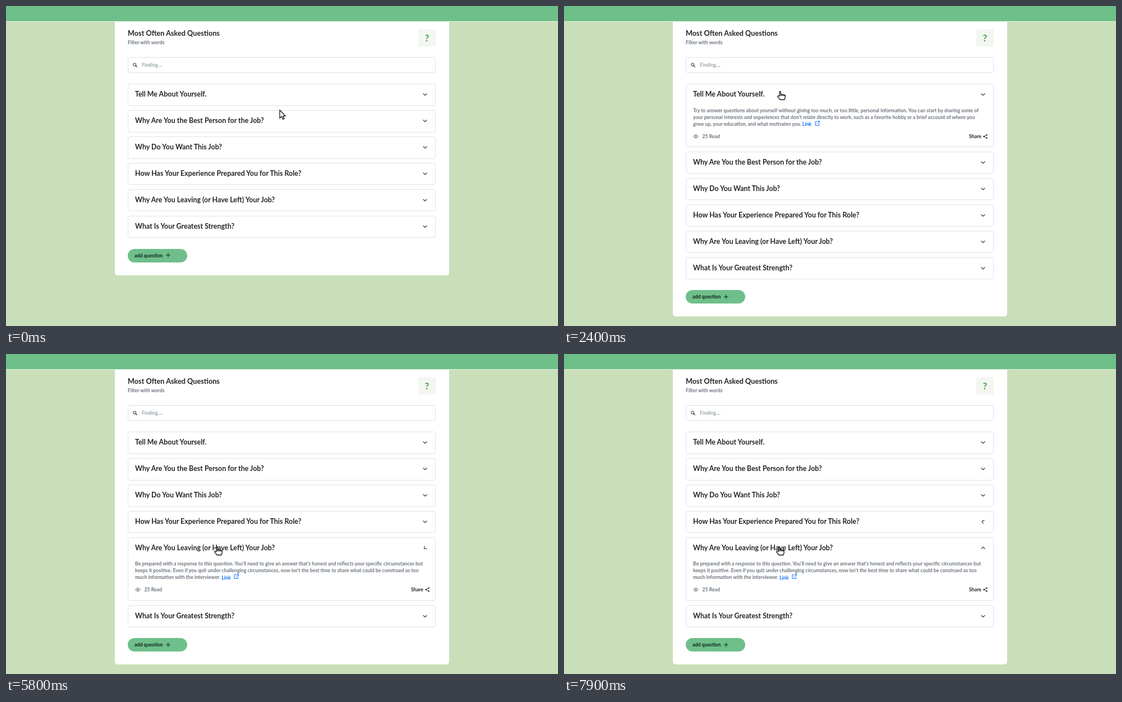
Animation of 984 by 569 pixels, one loop 8000 ms. Source, as an HTML page:

```html
<!DOCTYPE html>
<html lang="en">
<head>
<meta charset="utf-8">
<title>Questions</title>
<style>
  html, body { margin: 0; width: 100%; height: 100%; overflow: hidden; background: #c9dfb9; }
  body { position: relative; font: 700 8.75px Lato, "Noto Sans", sans-serif; color: #212529; white-space: nowrap; }
  svg { fill: none; stroke: currentColor; overflow: visible; }
  #bar { position: absolute; inset: 0 0 auto; height: 27px; background: #6fbf8b; border-bottom: 1px solid #e8f2e3; }
  #page { position: absolute; left: 194px; top: 0; width: 596px; }
  #card { position: relative; box-sizing: border-box; padding: 138.3px 24px 23px 23px; background: #fff; border-radius: 0 0 5px 5px; }
  .at { position: absolute; line-height: 20px; }
  #title { left: 23px; top: 38px; font-size: 12.7px; }
  #sub { left: 23px; top: 55px; color: #6c757d; }
  #help { left: 541px; top: 41px; width: 31px; height: 31px; border-radius: 4px; background: #f4f6f1; color: #43a547; font-size: 17px; line-height: 31px; text-align: center; }
  #search { left: 23px; top: 91px; width: 549px; height: 28px; box-sizing: border-box; border: 1px solid #dee2e6; border-radius: 4px; padding-left: 24px; line-height: 26px; color: #9ba5ab; }
  #search svg { position: absolute; left: 8px; top: 9px; color: #212529; }
  .item { position: relative; box-sizing: border-box; height: 39.4px; margin-bottom: 7.53px; border: 1px solid #dfe3e6; border-radius: 4px; overflow: hidden; }
  .item.open { height: 113.2px; }
  .item > * { position: absolute; }
  .item h2 { margin: 0; left: 12px; top: 8px; font-size: 12.45px; line-height: 20px; }
  .chevron { left: 523.5px; top: 13px; color: #4a4f54; }
  .more { display: none; left: 12px; top: 40.5px; width: 524px; color: #6c757d; }
  .open .more { display: block; }
  .more p { margin: 0; height: 36px; line-height: 11.9px; }
  .more b { color: #0d6efd; }
  .more b svg { margin-left: 3.5px; vertical-align: .3px; }
  .reads, .share { position: absolute; top: 42px; line-height: 20px; }
  .reads { left: 16.5px; }
  .reads svg { position: absolute; left: -16.5px; top: 6px; }
  .share { right: 10px; color: #212529; }
  .share svg { position: absolute; left: calc(100% + 2.5px); top: 6px; }
  #add { position: relative; margin-top: 19.4px; width: 106px; height: 24px; border-radius: 12px; background: #6fbf8b; color: #10251a; line-height: 23px; text-indent: 12px; }
  #add svg { position: absolute; left: 68px; top: 7.5px; }
  #cursor { position: absolute; left: 0; top: 0; }
  #cursor path { fill: #fff; stroke: #111; stroke-width: 1.3; stroke-linejoin: round; }
</style>
</head>
<body>
<div id="page"><div id="card">
  <div class="at" id="title">Most Often Asked Questions</div>
  <div class="at" id="sub">Filter with words</div>
  <div class="at" id="help">?</div>
  <div class="at" id="search"><svg width="8" height="8"><circle cx="3.2" cy="3.2" r="2.5"/><path d="M5 5L7.5 7.5" stroke-width="1.3"/></svg>Finding....</div>
  <div id="items"></div>
  <div id="add">add question<svg width="8" height="8"><path d="M4 0V8M0 4H8"/></svg></div>
</div></div>
<div id="bar"></div>
<svg id="cursor" width="18" height="20"><path></path></svg>
<script>
const LOOP = 8000, STEP = 100;

const questions = [
  ["Tell Me About Yourself.",
   "Try to answer questions about yourself without giving too much, or too little, personal information. You can start by sharing some of",
   "your personal interests and experiences that don’t relate directly to work, such as a favorite hobby or a brief account of where you",
   "grew up, your education, and what motivates you. "],
  ["Why Are You the Best Person for the Job?",
   "Are you the best candidate for the job? The hiring manager wants to know whether you have all the required qualifications. Be",
   "prepared to explain why you're the applicant who should be hired. Make your response a confident, concise, focused sales",
   "pitch that explains what you have to offer. "],
  ["Why Do You Want This Job?",
   "Why are you a good fit for the position? What would you accomplish if you were hired? This interview question gives you an opportunity",
   "to show the interviewer what you know about the job and the company, so take time beforehand to thoroughly research the company,",
   "its products, services, culture, and mission. "],
  ["How Has Your Experience Prepared You for This Role?",
   "Hiring managers use this question to learn how your previous work experience and educational background fit the job. To prepare to",
   "respond, make a list of the most relevant qualifications you have and match them to the requirements listed in the job description.",
   ""],
  ["Why Are You Leaving (or Have Left) Your Job?",
   "Be prepared with a response to this question. You'll need to give an answer that's honest and reflects your specific circumstances but",
   "keeps it positive. Even if you quit under challenging circumstances, now isn't the best time to share what could be construed as too",
   "much information with the interviewer. "],
  ["What Is Your Greatest Strength?"]
];

// Per item: [time, open, chevron angle]
const toggles = [
  [[2400, 1, 0], [2900, 1, 70], [3000, 1, 180], [3300, 0, 110], [3400, 0, 0]],
  [[3800, 1, 45], [3900, 1, 180], [4100, 0, 110], [4200, 0, 0]],
  [[4700, 1, 40], [4800, 1, 180], [5000, 0, 110], [5100, 0, 0]],
  [[6400, 1, 45], [6500, 1, 180], [7800, 0, 160], [7900, 0, 110]],
  [[5800, 1, 45], [5900, 1, 180]],
  []
];

// [time, offset]
const scroll = [[6600, 0], [6700, 22.3], [6800, 54], [6900, 74], [7000, 74], [7400, 0]];

// [time, x, y, shape]
const path = [
  [0, 487, 184, "arrow"], [200, 477, 189, "hand"], [300, 477, 189, "hand"],
  [1100, 410, 157, "hand"], [1200, 398, 136, "arrow"], [1400, 355, 105, "beam"],
  [1500, 343, 101, "beam"], [1700, 343, 101, "beam"], [1800, 344, 100, "beam"],
  [1900, 344, 100, "arrow"], [2200, 374, 142, "hand"], [2400, 380, 151, "hand"],
  [3300, 380, 152, "hand"], [3700, 363, 211, "hand"], [4100, 362, 212, "hand"],
  [4300, 361, 263, "hand"], [4400, 361, 263, "hand"], [4500, 360, 253, "hand"],
  [5100, 360, 253, "hand"], [5300, 370, 344, "hand"], [5500, 370, 344, "hand"],
  [5600, 371, 342, "hand"], [5900, 371, 342, "hand"], [6200, 365, 299, "hand"],
  [6600, 365, 299, "hand"], [6700, 374, 361, "arrow"], [7000, 374, 361, "arrow"],
  [7400, 361, 316, "hand"], [7500, 361, 316, "hand"], [7600, 361, 305, "hand"],
  [7700, 361, 305, "hand"], [7900, 378, 342, "hand"]
];

const shapes = {
  arrow: "M1 1V15.5L4.4 12.4L6.7 17.4L9 16.3L6.8 11.6H11.3Z",
  hand: "M4.2 9V2.2Q4.2 1 5.3 1T6.4 2.2V6.3Q7.4 5.4 8.5 6.5Q9.8 5.7 10.9 6.9Q12 6.2 13 7.2Q14.2 7 14.2 8.6V11.5L13 15.5H5.3L1 10.4Q.6 8.8 2.2 8.6ZM6.4 6.3V9M8.6 6.5V9M10.9 6.9V9M13 7.2V9",
  beam: "M.8 1H2.6L3.5 1.8L4.4 1H6.2M3.5 1.8V14.5M.8 15.5H2.6L3.5 14.5L4.4 15.5H6.2"
};

const icon = (w, h, body) => `<svg width="${w}" height="${h}">${body}</svg>`;
const linkIcon = icon(9, 9, '<path d="M4 1.5H1V8.3H7.5V5M5 .6H8.4V4M8.2 .8L3.7 5.3"/>');
const eyeIcon = icon(10, 8, '<path d="M.5 4Q5-2.2 9.5 4Q5 10.2 .5 4Z"/><circle cx="5" cy="4" r="1.5"/>');
const shareIcon = icon(8, 8, '<path d="M6.5 1.2L1.5 4L6.5 6.8"/><g fill="currentColor" stroke="none"><circle cx="6.5" cy="1.2" r="1.2"/><circle cx="1.4" cy="4" r="1.2"/><circle cx="6.5" cy="6.8" r="1.2"/></g>');

const items = questions.map(([title, ...lines]) => {
  const el = document.createElement("div");
  el.className = "item";
  el.innerHTML = `<h2>${title}</h2>
    <svg class="chevron" width="10" height="10"><path d="M1.6 3.5L5 6.8L8.4 3.5" stroke-width="1.35"/></svg>
    <div class="more"><p>${lines.join("<br>")}<b>Link ${linkIcon}</b></p>
    <span class="reads">${eyeIcon}25 Read</span><span class="share">Share${shareIcon}</span></div>`;
  document.getElementById("items").append(el);
  return { el, chevron: el.querySelector(".chevron") };
});

const page = document.getElementById("page");
const cursor = document.getElementById("cursor");
const outline = cursor.firstElementChild;

const latest = (rows, t) => rows.findLast(row => row[0] <= t);

function glide(rows, t, column) {
  const next = rows.findIndex(row => row[0] > t);
  if (next < 0) return rows.at(-1)[column];
  if (next === 0) return rows[0][column];
  const a = rows[next - 1], b = rows[next];
  return a[column] + (b[column] - a[column]) * (t - a[0]) / (b[0] - a[0]);
}

function draw(t) {
  items.forEach(({ el, chevron }, i) => {
    const [, open, angle] = latest(toggles[i], t) || [0, 0, 0];
    el.classList.toggle("open", !!open);
    chevron.style.transform = `rotate(${angle}deg)`;
  });
  page.style.top = `${-glide(scroll, t, 1)}px`;
  const x = Math.round(glide(path, t, 1)), y = Math.round(glide(path, t, 2));
  cursor.style.transform = `translate(${x}px, ${y}px)`;
  outline.setAttribute("d", shapes[latest(path, t)[3]]);
}

const start = performance.now();
function tick() {
  const t = (performance.now() - start) % LOOP;
  draw(Math.floor(t / STEP) * STEP);
  requestAnimationFrame(tick);
}
tick();
</script>
</body>
</html>
```
